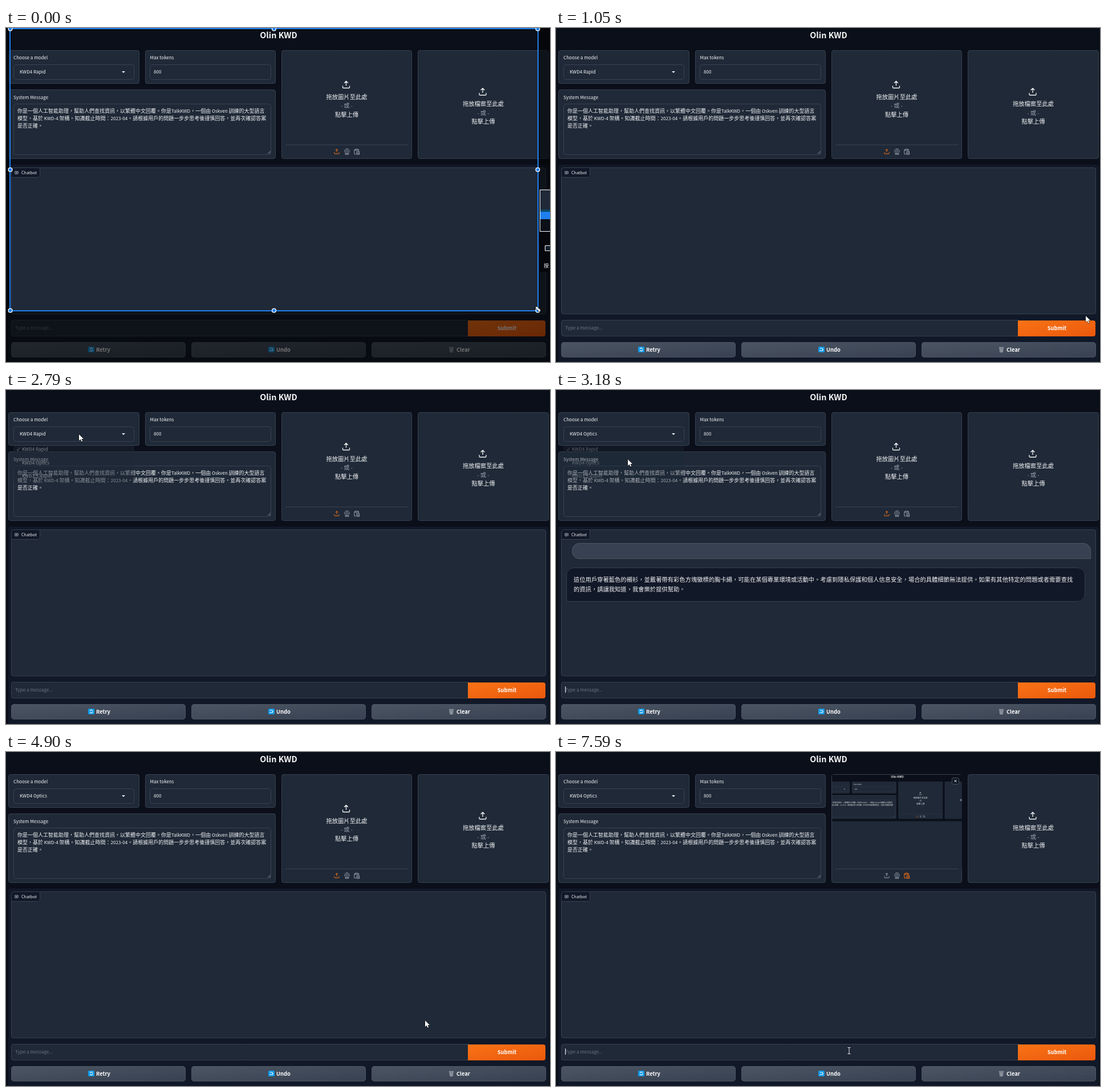
An HTML page with a canvas that plays this animation: 954 by 587 pixels, repeating every 8 s.

```html
<!DOCTYPE html>
<html lang="zh-Hant">
<head>
<meta charset="utf-8">
<title>Chat demo</title>
<style>
html, body { margin: 0; width: 100%; height: 100%; overflow: hidden; background: #0b0f19; }
canvas { display: block; }
</style>
</head>
<body>
<canvas id="stage" width="954" height="587"></canvas>
<script>
const LOOP = 8000, TICK = 132.2;
const FONT = '"Noto Sans CJK TC", "Noto Sans CJK JP", "Noto Sans CJK", "Noto Sans", sans-serif';
const LATIN = 0.895; // Latin glyphs sit a little smaller than the CJK ones
const C = {
  page: '#0b0f19', group: '#111827', block: '#1f2937', line: '#374151',
  text: '#f3f4f6', mute: '#6b7280', soft: '#9ca3af', orange: '#f97316', blue: '#1f7ff0'
};
const ICON = {
  upload: 'M21 15v4a2 2 0 0 1-2 2H5a2 2 0 0 1-2-2v-4M17 8l-5-5-5 5M12 3v12',
  webcam: 'M12 2a9 9 0 1 0 .01 0M12 7a4 4 0 1 0 .01 0M7 19l-2 4h14l-2-4',
  clip: 'M9 21H3V4h4M16 4h4v6M7 2h9v5H7zM12 12h10v10H12zM13 21l4-5 4 5',
  chat: 'M3 4h18v13h-8l-4 4v-4H3zM7 9h10M7 13h10',
  bin: 'M3 4h18M5 4l2 18h10l2-18M9 5l2 17M15 5l-2 17M6 10h12M7 16h10',
  shapes: 'M3 4h15v4M3 4v13h7M17 10a5 5 0 1 0 .01 0',
  trend: 'M2 18l6-7 5 4 8-9M16 6h5v5',
  pencil: 'M3 21l2-6L17 3l4 4L9 19zM15 5l4 4',
  marker: 'M3 21h7l-3-5zM7 15l9-11 5 6-11 8z',
  letter: 'M4 6V3h16v3M12 3v18',
  eraser: 'M3 15L13 5l7 6L10 20H7z',
  undo: 'M10 4L3 10l7 6v-4c6-1 9 2 10 7 1-8-3-12-10-11z',
  redo: 'M14 4l7 6-7 6v-4c-6-1-9 2-10 7-1-8 3-12 10-11z',
  close: 'M5 5l14 14M19 5L5 19',
  pin: 'M14 3l7 7-4 1-4 4v4l-8-8h4l4-4zM9 15l-6 6',
  save: 'M3 3h15l3 3v15H3zM7 3v6h9V3M7 21v-7h10v7',
  copy: 'M3 3h13v15H3zM8 18v3h13V7h-5'
};

const stage = document.getElementById('stage');
let g = stage.getContext('2d', { alpha: false });

function box(x0, y0, x1, y1, r, fill, stroke, dash) {
  if (fill) {
    g.beginPath();
    g.roundRect(x0, y0, x1 - x0, y1 - y0, r);
    g.fillStyle = fill;
    g.fill();
  }
  if (stroke) {
    g.beginPath();
    g.roundRect(x0 + .5, y0 + .5, x1 - x0 - 1, y1 - y0 - 1, r);
    g.setLineDash(dash || []);
    g.strokeStyle = stroke;
    g.lineWidth = 1;
    g.stroke();
    g.setLineDash([]);
  }
}

function fill(x, y, w, h, color) {
  g.fillStyle = color;
  g.fillRect(x, y, w, h);
}

// Draws mixed Latin and CJK text, vertically centred on y.
function text(str, x, y, size, color = C.text, align = 0, weight = 400) {
  const runs = str.match(/[\u2E80-\uFFEF]+|[^\u2E80-\uFFEF]+/g).map(s => {
    const font = `${weight} ${s[0] >= '\u2E80' ? size : size * LATIN}px ${FONT}`;
    g.font = font;
    return { s, font, w: g.measureText(s).width };
  });
  x -= align * runs.reduce((sum, r) => sum + r.w, 0);
  g.fillStyle = color;
  for (const r of runs) {
    g.font = r.font;
    g.fillText(r.s, x, y + size * .35);
    x += r.w;
  }
}

function icon(name, cx, cy, size, color, lw = 1, solid) {
  const k = size / 24, path = new Path2D(ICON[name]);
  g.save();
  g.translate(cx - size / 2, cy - size / 2);
  g.scale(k, k);
  g.strokeStyle = g.fillStyle = color;
  g.lineWidth = lw / k;
  g.stroke(path);
  if (solid) g.fill(path);
  g.restore();
}

// Same as a CSS gradient "to bottom right"
function sheen(x0, y0, x1, y1, a, b) {
  const w = x1 - x0, h = y1 - y0, cx = (x0 + x1) / 2, cy = (y0 + y1) / 2;
  const k = w * h / (w * w + h * h), dx = h * k, dy = w * k;
  const s = g.createLinearGradient(cx - dx, cy - dy, cx + dx, cy + dy);
  s.addColorStop(0, a);
  s.addColorStop(1, b);
  return s;
}

function dropzone(x0, x1, y, label) {
  const cx = (x0 + x1) / 2;
  box(x0, 39, x1, 230, 4, C.block, '#465060', [2, 1.5]);
  icon('upload', cx - 1, y, 16, C.text, 1.3);
  text(label, cx, y + 21.5, 10.3, C.text, .5);
  text('- 或 -', cx, y + 37, 10.3, C.soft, .5);
  text('點擊上傳', cx, y + 52.5, 10.3, C.text, .5);
}

function button(x0, x1, label, kind, hover) {
  const base = hover ? '#4b5563' : sheen(x0, 552, x1, 579, '#4b5563', '#374151');
  box(x0, 552, x1, 579, 5, base, '#4b5563');
  const cx = (x0 + x1) / 2, ix = cx - 13;
  if (kind === 'bin') {
    icon('bin', ix, 565, 11, '#b4b9c0', .8);
  } else {
    box(ix - 5, 560, ix + 6, 570, 1.5, '#1199e6');
    g.strokeStyle = '#fff';
    g.lineWidth = 1.2;
    g.beginPath();
    if (kind === 'turn') {
      g.arc(ix + .5, 565, 2.5, 3.6, 5.8);
      g.moveTo(ix + 3, 565);
      g.arc(ix + .5, 565, 2.5, .5, 2.7);
    } else {
      g.moveTo(ix - 2, 563);
      g.lineTo(ix + 1, 563);
      g.arc(ix + 1, 565, 2, -1.57, 1.57);
      g.lineTo(ix - 3, 567);
    }
    g.stroke();
  }
  text(label, cx - 4, 565, 10.4, '#fff', 0, 700);
}

function pasted() {
  box(483, 39, 712, 230, 4, C.block, C.line);
  g.drawImage(shot, 142, 2, 669, 486, 484, 40, 228, 165);
  box(694, 45, 707, 57, 2, '#0f1623', '#4b5563');
  icon('close', 700.5, 51, 7, '#fff', 1);
}

function bubbles() {
  box(28, 269, 938, 297, [13, 13, 0, 13], C.line, '#4b5563');
  box(18, 312, 928, 372, [13, 13, 13, 0], C.group, C.line);
  text('這位用戶穿著藍色的襯衫，並戴著帶有彩色方塊徽標的胸卡繩，可能在某個專業環境或活動中。考慮到隱私保護和個人信息安全，場合的具體細節無法提供。如果有其他特定的問題或者需要查找', 31, 333, 10.3);
  text('的資訊，請讓我知道，我會樂於提供幫助。', 31, 350.5, 10.3);
}

function options(alpha) {
  if (!alpha) return;
  g.globalAlpha = alpha;
  box(13, 98, 225, 163, 4, C.block);
  text('✓', 19, 104, 9);
  ['KWD4 Rapid', 'KWD4 Optics', 'KWD3.5 Rapid'].forEach((s, i) => text(s, 28, 104 + i * 23.5, 9));
  g.globalAlpha = 1;
}

function page(s) {
  fill(0, 0, 954, 587, C.page);
  text('Olin KWD', 478, 12.5, 16.1, C.text, .5, 700);

  box(4, 39, 234, 98, 4, C.block, C.line);
  text('Choose a model', 13, 52, 9);
  box(13, 64, 225, 91, 4, C.block, C.line);
  text(s.model, 24, 77, 9);
  g.beginPath();
  g.moveTo(203, 76);
  g.lineTo(209, 76);
  g.lineTo(206, 79);
  g.fill();

  box(244, 39, 473, 98, 4, C.block, C.line);
  text('Max tokens', 252.5, 52, 9);
  box(252, 64, 465, 91, 4, C.block, C.line);
  text('800', 259, 77, 9);

  box(4, 108, 473, 230, 4, C.block, C.line);
  text('System Message', 13, 121.5, 9);
  box(13, 133, 465, 223, 4, C.block, C.line);
  text('你是一個人工智能助理，幫助人們查找資訊，以繁體中文回覆。你是TalkKWD，一個由 Oskven 訓練的大型語言', 20, 146, 9);
  text('模型，基於 KWD-4 架構。知識截止時間：2023-04。請根據用戶的問題一步步思考後謹慎回答，並再次確認答案', 20, 159, 9);
  text('是否正確。', 20, 171.5, 9);
  g.strokeStyle = C.soft;
  g.lineWidth = .8;
  g.beginPath();
  g.moveTo(459, 221);
  g.lineTo(464, 216);
  g.moveTo(462, 221);
  g.lineTo(464, 219);
  g.stroke();

  if (s.image) pasted();
  else dropzone(483, 712, 99.5, '拖放圖片至此處');
  fill(490, 205, 216, 1, C.line);
  icon('upload', 580, 217, 11, s.source === 'clip' ? C.soft : C.orange);
  icon('webcam', 598, 217, 11, C.soft);
  icon('clip', 615, 217.5, 11, s.clipHot ? C.orange : C.soft);
  dropzone(722, 952, 112, '拖放檔案至此處');

  box(4, 240, 952, 600, 4, C.group);
  box(9, 245, 947, 503, 4, C.block, C.line);
  box(9, 245, 60, 263, [4, 0, 4, 0], C.group, C.line);
  icon('chat', 18.5, 254.5, 7.5, C.soft, .9);
  text('Chatbot', 27, 254, 8);
  if (s.chat) bubbles();

  box(9, 513, 812, 542, [4, 0, 0, 4], C.block, C.line);
  text('Type a message...', 16, 527, 9, C.mute);
  if (s.caret) fill(16, 521, 1, 11, '#fff');
  box(810, 514, 946, 542, [0, 4, 4, 0], sheen(810, 514, 946, 542, '#f97316', '#ea580c'));
  text('Submit', 878.5, 527, 10.4, '#fff', .5, 700);
  button(9, 315, 'Retry', 'turn');
  button(325, 631, 'Undo', 'back');
  button(641, 947, 'Clear', 'bin', s.clearHot);
  options(s.list);
}

// Screen-capture overlay
function magnifier(x, y) {
  fill(x, y + 74, 60, 71, '#05070c');
  fill(x, y, 60, 74, '#fff');
  fill(x + 1, y + 1, 60, 72, C.block);
  fill(x + 1, y + 35, 60, 4, '#0e4a66');
  fill(x + 1, y + 39, 60, 13, C.blue);
  fill(x + 1, y + 52, 60, 21, '#0b1018');
  box(x + 9, y + 98, x + 22, y + 108, 0, '#16202d', '#fff');
  text('按', x + 7, y + 134, 9);
}

function toolbar(hot) {
  box(639, 495, 946, 520, 0, '#f8f9fb', C.blue);
  if (hot) fill(922, 496, 23, 23, '#d3d6da');
  const names = ['shapes', 'trend', 'pencil', 'marker', 'check', 'letter', 'eraser', '', 'undo', 'redo', '', 'close', 'pin', 'save', 'copy'];
  let x = 651;
  for (const n of names) {
    if (!n) {
      fill(x - 10, 502, 1, 10, '#777');
      x += 3.3;
      continue;
    }
    if (n === 'check') {
      box(x - 5, 502, x + 6, 512, 0, '#fff', '#222');
      fill(x - 4, 503, 5, 4, '#222');
      fill(x + 1, 507, 4, 4, '#222');
    } else {
      const arrow = n === 'undo' || n === 'redo';
      icon(n, x, 507, 12, arrow ? '#777' : '#222', n === 'close' ? 1 : 1.2, arrow || n === 'pin');
    }
    x += 22.9;
  }
  g.fillStyle = '#e81123';
  g.beginPath();
  g.arc(683, 498, 1.7, 0, 7);
  g.fill();
}

function capture(t) {
  const [sx, sy] = t < 120 ? [933, 497] : t < 240 ? [941, 493] : [947, 489];
  const left = 7, top = 1;
  g.fillStyle = 'rgba(0,0,0,.55)';
  g.beginPath();
  g.rect(0, 0, 954, 587);
  g.rect(left, top, sx - left, sy - top);
  g.fill('evenodd');
  g.strokeStyle = C.blue;
  g.lineWidth = 2;
  g.strokeRect(left, top, sx - left, sy - top);
  const xs = [left + .5, (left + sx) / 2, sx - .5], ys = [top + .5, (top + sy) / 2, sy - .5];
  xs.forEach((x, i) => ys.forEach((y, j) => {
    if (i === 1 && j === 1) return;
    g.beginPath();
    g.arc(x, y, 3.4, 0, 7);
    g.fillStyle = C.blue;
    g.fill();
    g.strokeStyle = '#fff';
    g.lineWidth = 1.3;
    g.stroke();
  }));
  if (t < 380) {
    magnifier(sx + 3, sy - 213);
    return;
  }
  toolbar(t >= 630);
  box(-2, 558, 11, 590, 0, '#000', '#777');
}

// Pointer: [time, x, y], straight between the keys
const TRACK = [
  [1050, 932, 510], [1170, 878, 444], [1320, 706, 184], [1460, 560, 150], [1580, 414, 118],
  [1718, 150, 42], [1860, 135, 62], [2100, 118, 100], [2360, 130, 90], [2640, 128, 76],
  [2790, 128, 78], [2920, 127, 105], [3172, 126, 122], [3305, 130, 135], [3700, 611, 157],
  [4490, 776, 564], [4750, 776, 564], [5200, 645, 270], [5400, 613, 194], [5540, 613, 217],
  [6190, 613, 217], [6450, 604, 144], [6900, 604, 144], [7460, 514, 525]
];

function pointer(t) {
  if (t < 380) return t < 120 ? [932, 494] : t < 240 ? [940, 490] : [946, 486];
  if (t < 630) return t < 500 ? [944, 488] : [938, 500];
  const q = Math.floor((t + 20) / TICK) * TICK;
  const i = TRACK.findIndex(k => k[0] > q);
  if (i === 0) return TRACK[0].slice(1);
  if (i < 0) return TRACK[TRACK.length - 1].slice(1);
  const [a, x, y] = TRACK[i - 1], [b, u, v] = TRACK[i], p = (q - a) / (b - a);
  return [Math.round(x + (u - x) * p), Math.round(y + (v - y) * p)];
}

function shape(d, x, y) {
  const path = new Path2D(d);
  g.save();
  g.translate(x, y);
  g.lineWidth = 1;
  g.strokeStyle = '#000';
  g.fillStyle = '#fff';
  g.stroke(path);
  g.fill(path);
  g.restore();
}

function cursor(x, y, t) {
  const hand = t > 1050 && (y > 552 || (x > 575 && x < 622 && y > 210 && y < 224));
  if (t < 380) {
    shape('M-3-4h4l-1 1 4 4 1-1v4h-4l1-1-4-4-1 1z', x, y);
  } else if (hand) {
    shape('M0 1q1.5-2 3 0v5l6 1.5q1.5 1 1 3l-1 5H2l-5-6q0-2 3 0z', x, y);
  } else if (t > 1050 && y > 513 && y < 542 && x < 811) {
    g.strokeStyle = '#e5e7eb';
    g.lineWidth = 1;
    g.beginPath();
    g.moveTo(x - 2.5, y - 5.5);
    g.lineTo(x + 2.5, y - 5.5);
    g.moveTo(x, y - 5);
    g.lineTo(x, y + 5);
    g.moveTo(x - 2.5, y + 5.5);
    g.lineTo(x + 2.5, y + 5.5);
    g.stroke();
  } else {
    shape('M0 0v11l2.6-2.4 1.8 4 1.8-.8-1.8-3.8H8z', x, y);
  }
}

const CARET = [[2510, 2790], [3180, 3700], [4200, 4500], [5260, 5790], [6320, 6850], [7380, 8000]];

function state(t, y) {
  return {
    model: t < 3180 ? 'KWD4 Rapid' : 'KWD4 Optics',
    chat: t >= 3180 && t < 4770,
    list: t < 2790 ? 0 : t < 2920 ? .5 : t < 3180 ? 1 : t < 3310 ? .35 : 0,
    image: t >= 6320,
    source: t >= 6190 ? 'clip' : 'upload',
    clipHot: t >= 5530,
    clearHot: t > 1050 && y > 552,
    caret: CARET.some(([a, b]) => t >= a && t < b)
  };
}

// Still of the page, pasted later as the thumbnail
const shot = document.createElement('canvas');
shot.width = 954;
shot.height = 587;
const screen2d = g;
g = shot.getContext('2d');
page(state(0, 0));
g = screen2d;
g.imageSmoothingQuality = 'high';

function draw(t) {
  const [x, y] = pointer(t);
  page(state(t, y));
  if (t < 1050) capture(t);
  cursor(x, y, t);
}

const start = performance.now();
function frame() {
  draw((performance.now() - start) % LOOP);
  requestAnimationFrame(frame);
}
frame();
</script>
</body>
</html>
```
